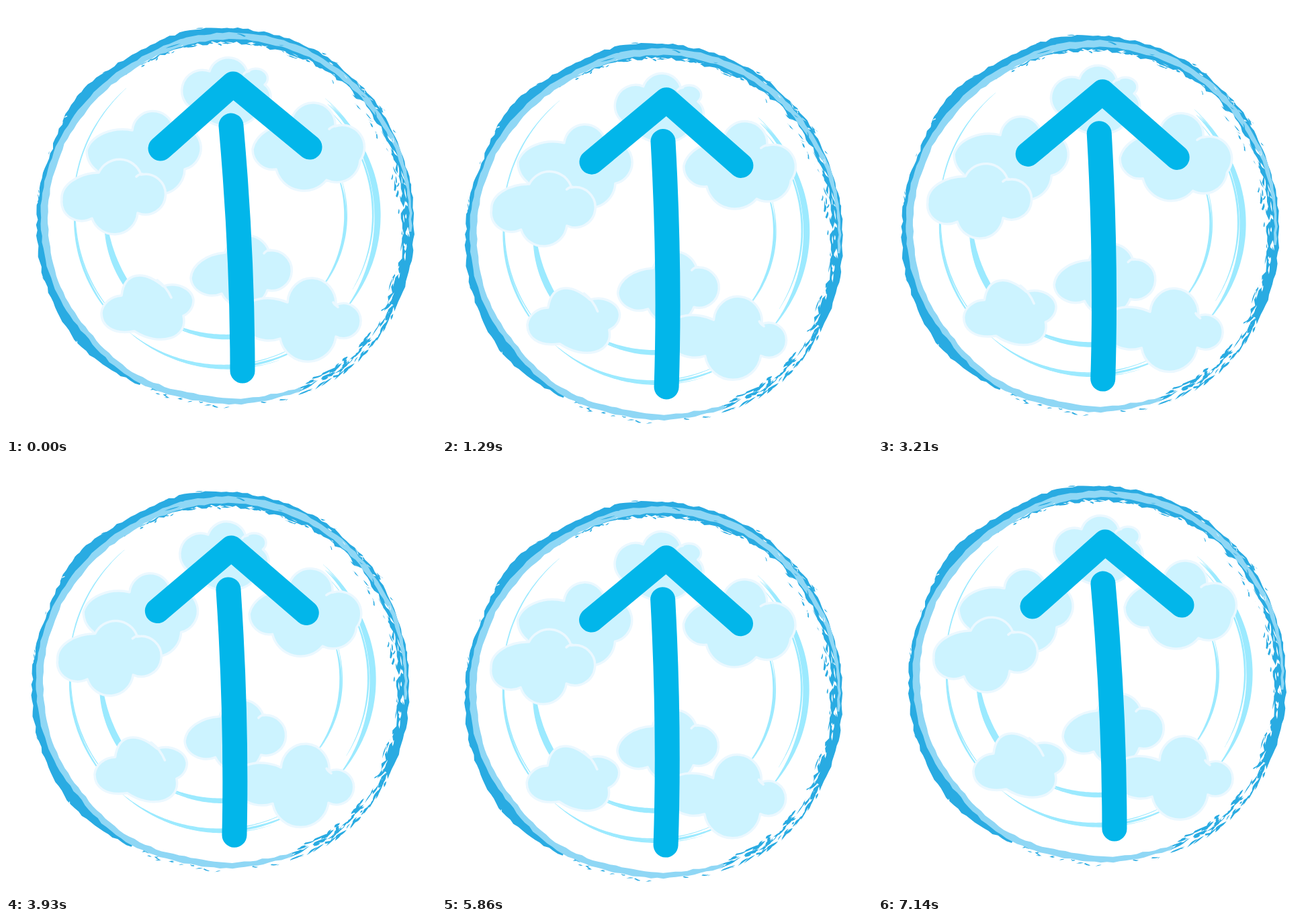
Write an HTML page that moves like this. It is 640 px wide and 640 px high and loops after 7210 ms.

```html
<!DOCTYPE html>
<html lang="en">
<head>
<meta charset="utf-8">
<title>Arrow in the clouds</title>
<style>
html, body { margin: 0; width: 100%; height: 100%; overflow: hidden; background: #fff; }
svg { display: block; width: 100%; height: 100%; }
.cloud { fill: #ccf3ff; stroke: #ebf8ff; stroke-width: 3.5; stroke-linejoin: round; stroke-linecap: round; }
.arrow { fill: none; stroke: #02b6ea; stroke-width: 37; stroke-linecap: round; stroke-linejoin: round; }
</style>
</head>
<body>
<svg viewBox="0 0 640 640">
  <g id="scene">
    <g id="brush"></g>
    <g class="cloud">
      <path d="M303 97A29 28 0 0 1 359 98A16 13 0 0 1 385 117A23 23 0 0 1 375 158A44 28 0 0 1 289 157A31 31 0 1 1 303 97ZM354 101Q357 97 362 97"/>
      <path d="M188 185A31 31 0 0 1 249 180A32 32 0 0 1 266 243A38 38 0 0 1 200 268A50 45 0 0 1 135 245A38 38 0 0 1 120 215A55 40 0 0 1 188 185ZM240 186Q244 181 250 180"/>
      <path d="M138 248A34 34 0 0 1 201 251A30 30 0 1 1 196 308A35 35 0 0 1 128 316A30 28 0 0 1 83 288A58 38 0 0 1 138 248ZM194 254Q198 250 203 250"/>
      <path d="M424 175A33 33 0 0 1 490 179A33 33 0 0 1 527 230A35 35 0 0 1 477 259A43 43 0 0 1 402 243A30 30 0 0 1 367 213A60 45 0 0 1 424 175ZM481 183Q487 178 494 178"/>
      <path d="M326 367A34 34 0 0 1 391 364A30 30 0 1 1 389 423A37 37 0 0 1 321 428A32 28 0 0 1 275 405A58 40 0 0 1 326 367ZM384 368Q388 363 394 363"/>
      <path d="M172 431C176 395 205 393 234 417A32 25 0 0 1 279 437A25 25 0 0 1 264 461C272 495 228 508 191 484C158 490 142 475 142 457A32 28 0 0 1 172 431ZM225 408Q239 418 246 434"/>
      <path d="M419 441A36 38 0 0 1 491 445A26 26 0 1 1 491 492A42 42 0 0 1 408 495C378 506 345 485 350 460C355 432 395 430 419 441ZM494 448Q488 444 487 441"/>
    </g>
    <path class="arrow" d="M230 212L338 116L452 210M335 178Q352 370 352 543"/>
  </g>
</svg>
<script>
const LOOP = 7210, TAU = Math.PI * 2;
const DARK = '#29abe2', LIGHT = '#8fd7f5', PALE = '#9ceaff', WHITE = '#fff';
const scene = document.getElementById('scene');
const brush = document.getElementById('brush');

let seed = 11;
const rnd = (lo = 0, hi = 1) => {
  seed = (seed * 16807) % 2147483647;
  return lo + (hi - lo) * seed / 2147483647;
};

// Angles in degrees, clockwise from the right.
const polar = (a, r, cx = 326, cy = 315) => {
  const k = a * TAU / 360;
  return (cx + r * Math.cos(k)).toFixed(1) + ' ' + (cy + r * Math.sin(k)).toFixed(1);
};

const add = (d, fill) => {
  const p = document.createElementNS('http://www.w3.org/2000/svg', 'path');
  p.setAttribute('d', d);
  p.setAttribute('fill', fill);
  brush.append(p);
};

// Smooth radial profile from values placed every 20 degrees.
const profile = v => a => {
  const x = ((a % 360) + 360) % 360 / 20, i = Math.floor(x), f = x - i;
  const s = f * f * (3 - 2 * f);
  return v[i] * (1 - s) + v[(i + 1) % 18] * s;
};

const outer = profile([281, 286, 290, 289, 283, 280, 281, 288, 285, 280, 277, 284, 279, 283, 282, 283, 282, 280]);
const inner = profile([264, 270, 278, 282, 278, 277, 272, 267, 268, 266, 265, 264, 261, 261, 260, 265, 267, 266]);
const mid = profile([276, 278, 280, 279, 275, 271, 272, 268, 270, 269, 268, 265, 264, 269, 272, 274, 274, 276]);
const width = profile([4, 2, 1, 4, 8, 10, 9, 8, 9, 11, 10, 10, 10, 10, 10, 9, 8, 6]);

function band(a0, a1, rOut, rIn, fill, step = 1.1, cx, cy) {
  const edge = r => {
    const pts = [];
    for (let a = a0; a <= a1; a += step) pts.push(polar(a, r(a), cx, cy));
    return pts;
  };
  add('M' + edge(rOut).concat(edge(rIn).reverse()).join('L') + 'Z', fill);
}

// Small brush marks lying roughly along the circle.
function flecks(n, a0, a1, lo, hi, fill, len, thick) {
  let d = '';
  while (n--) {
    const a = rnd(a0, a1), l = rnd(len * .3, len) / 5, w = rnd(thick * .3, thick);
    const r = outer(a) + rnd(lo, hi), t = rnd(-3, 4);
    d += `M${polar(a, r)}Q${polar(a + l * .4, r + w)} ${polar(a + l, r + t)}` +
         `L${polar(a + l * .8, r + t - w * .7)}Q${polar(a + l * .5, r - w)} ${polar(a, r)}Z`;
  }
  add(d, fill);
}

// Tapered arc of the thin inner circles.
function taper(r, a0, a1, w, drift = 0) {
  const at = a => (a - a0) / (a1 - a0);
  const half = a => Math.sin(Math.PI * at(a)) * w / 2 + .15;
  const base = a => r + drift * at(a);
  band(a0, a1, a => base(a) + half(a), a => base(a) - half(a), PALE, 1, 328, 313);
}

function paint() {
  taper(225, -48, 40, 9);
  taper(227, -47, -12, 5, -2);
  taper(220, -46, 30, 2.5, -3);
  taper(229, -50, 10, 2, -4);
  taper(224, 55, 130, 4, 1);
  taper(219, 60, 128, 1.4, 6);
  taper(228, 70, 125, 1.2, -3);
  taper(226, 132, 192, 3);
  taper(222, 135, 185, 1.3, 3);
  taper(226, 178, 232, 1.6, 16);
  taper(179, 60, 118, 6);
  taper(183, 65, 125, 2, -2);
  taper(179, 125, 183, 9);
  taper(184, 130, 178, 2, -2);
  taper(177, -25, 40, 3.5);
  taper(180, -20, 36, 1.3, -2);

  const rough = a => (a > 225 ? 3 : 1.2);
  band(117, 388, a => outer(a) + rnd(-1.5, 1.5), a => inner(a) + rnd(-rough(a), rough(a)), DARK, 1.6);
  flecks(72, 24, 64, -15, 1, DARK, 25, 3.4);
  flecks(18, 60, 120, -4, 3, DARK, 14, 1.8);
  flecks(34, 235, 335, -25, -18, DARK, 18, 2);
  flecks(14, 335, 385, -23, -16, DARK, 22, 3);
  flecks(20, 150, 350, -1, 2, DARK, 14, 2);

  band(66, 366, a => mid(a) + width(a) / 2 + rnd(-1, 1), a => mid(a) - width(a) / 2 + rnd(-1, 1), LIGHT, 1.9);
  flecks(10, 250, 340, -16, -5, DARK, 28, 1.6);

  flecks(34, -28, 26, -20, -8, WHITE, 20, 3);
  flecks(30, 235, 335, -25, -18, WHITE, 18, 1.9);
  flecks(12, 300, 335, -8, 2, WHITE, 12, 1.5);
  flecks(16, 125, 225, 0, 3, WHITE, 9, 1.8);
  flecks(7, 30, 52, -13, -3, WHITE, 22, 4);
}

// Cubic Bezier easing (.3, .2, .4, 1).
function ease(x) {
  let lo = 0, hi = 1, s = x;
  const curve = (s, p, q) => 3 * (1 - s) * (1 - s) * s * p + 3 * (1 - s) * s * s * q + s * s * s;
  for (let i = 0; i < 24; i++) {
    s = (lo + hi) / 2;
    if (curve(s, .3, .4) < x) lo = s; else hi = s;
  }
  return curve(s, .2, 1);
}

function draw(ms) {
  const t = ms % LOOP;
  const u = t * 3 / LOOP % 1;
  const tilt = 2 * (u < .5 ? ease(u * 2) : 1 - ease(u * 2 - 1));
  const drop = 7.5 * (1 - Math.cos(TAU * (t + 54) * 2 / LOOP));
  scene.setAttribute('transform', `translate(0 ${drop.toFixed(3)}) rotate(${tilt.toFixed(4)})`);
}

paint();
const start = performance.now();
const tick = () => {
  draw(performance.now() - start);
  requestAnimationFrame(tick);
};
tick();
</script>
</body>
</html>
```
